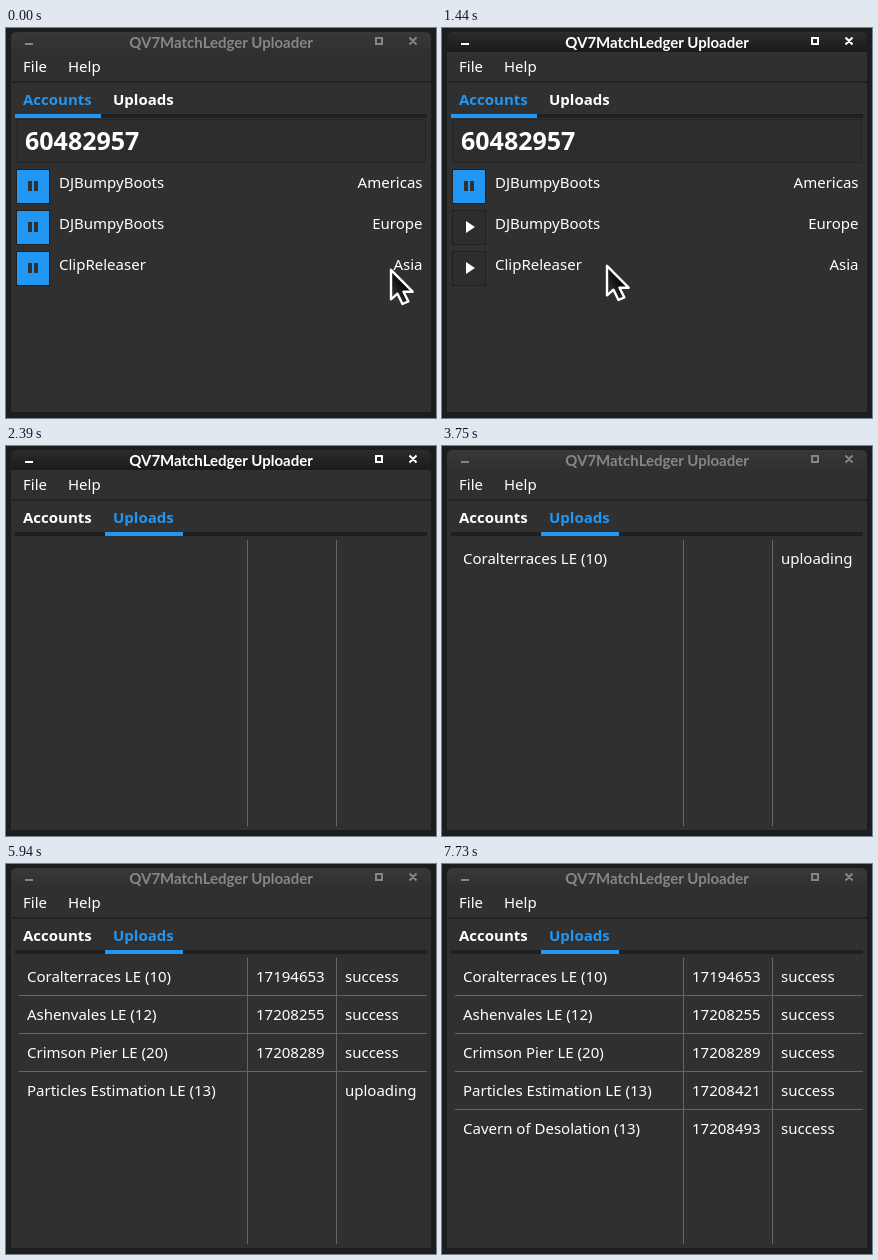
Animation, 430 px wide and 390 px high, one loop 8.35 s. Source, as an HTML page:

```html
<!DOCTYPE html>
<html lang="en">
<head>
<meta charset="utf-8">
<title>Uploader</title>
<style>
  html, body { margin: 0; width: 100%; height: 100%; overflow: hidden; background: #1c1e1e; }
  svg { display: block; width: 430px; height: 390px; }
  text { font: 15px "Noto Sans", sans-serif; fill: #fff; white-space: pre; }
  .right { text-anchor: end; }
  .tab { font-weight: 700; }
  .tab.on { fill: #2196f3; }
  .account { font-size: 25px; font-weight: 700; }
  #bar { fill: url(#active); }
  #caption text { font: 700 15px Lato, sans-serif; text-anchor: middle; }
  #caption { fill: #fff; stroke: #fff; }
  #caption text { stroke: none; }
  .blur #bar { fill: url(#inactive); }
  .blur #caption { stroke: #868686; }
  .blur #caption text { fill: #868686; }
  .rule { fill: #666; }
  .off { display: none; }
</style>
</head>
<body>
<svg viewBox="0 0 430 390" id="stage">
  <defs>
    <linearGradient id="active" x2="0" y2="1">
      <stop stop-color="#2c2c2c"/><stop offset="1" stop-color="#1a1a1a"/>
    </linearGradient>
    <linearGradient id="inactive" x2="0" y2="1">
      <stop stop-color="#383838"/><stop offset="1" stop-color="#303030"/>
    </linearGradient>
    <linearGradient id="ink" x1="0" y1="1" x2=".6" y2=".4">
      <stop stop-color="#444"/><stop offset="1" stop-color="#050505"/>
    </linearGradient>
  </defs>

  <rect x="5" y="20" width="420" height="364" fill="#303030"/>
  <path id="bar" d="M5 24V10Q5 4 11 4H419Q425 4 425 10V24Z"/>
  <g id="caption" stroke-width="2">
    <text x="215" y="20">QV7MatchLedger Uploader</text>
    <path fill="none" d="M19 16H27M370 10H376V16H370ZM403.500 9.500L410.500 16.500M410.500 9.500L403.500 16.500"/>
  </g>

  <text x="17" y="44">File</text>
  <text x="62" y="44">Help</text>
  <rect x="5" y="53" width="420" height="2" fill="#232323"/>

  <rect x="9" y="86" width="412" height="4" fill="#1f1f1f"/>
  <rect id="mark" y="86" height="4" fill="#2196f3"/>
  <text id="tabA" class="tab" x="17" y="77">Accounts</text>
  <text id="tabB" class="tab" x="107" y="77">Uploads</text>

  <g id="accounts">
    <rect x="10.500" y="91.500" width="409" height="43" fill="#2d2d2d" stroke="#262626"/>
    <text class="account" x="19" y="122">60482957</text>
  </g>
  <g id="uploads">
    <rect class="rule" x="241" y="94" width="1" height="286"/>
    <rect class="rule" x="330" y="94" width="1" height="286"/>
  </g>

  <path id="cursor" d="M1 2.800V32.300L7.500 26.700L12.500 37L18.300 34.400L13.500 24.700H22.600Z"
        fill="url(#ink)" stroke="#fff" stroke-width="2.400" stroke-linejoin="round"/>
</svg>

<script>
const LOOP = 8350;
const FOCUS = 560, BLUR = 2840, SWITCH = 2240, LEAVE = 2390;

// name, region, time of pausing
const players = [
  ["DJBumpyBoots", "Americas", Infinity],
  ["DJBumpyBoots", "Europe", 1340],
  ["ClipReleaser", "Asia", 610]
];

// map, replay id, times of: uploading, processing, success
const replays = [
  ["Coralterraces LE (10)", "17194653", 3750, 4370, 4650],
  ["Ashenvales LE (12)", "17208255", 4650, 4870, 5320],
  ["Crimson Pier LE (20)", "17208289", 5320, 5600, 5940],
  ["Particles Estimation LE (13)", "17208421", 5940, 6450, 7060],
  ["Cavern of Desolation (13)", "17208493", 6500, 7110, 7730]
];

// pointer moves: start, end, steps, x, y, downward bow
const home = [384, 239];
const moves = [
  [50, 400, 7, 32, 243, 23],
  [780, 890, 2, 30, 209, 0],
  [1170, 1170, 1, 28, 210, 0],
  [1390, 1440, 2, 164, 235, 0],
  [1660, 2020, 7, 138, 68, 0]
];

const $ = id => document.getElementById(id);

function add(parent, tag, attrs, text = "") {
  const el = document.createElementNS("http://www.w3.org/2000/svg", tag);
  for (const key in attrs) el.setAttribute(key, attrs[key]);
  el.textContent = text;
  return parent.appendChild(el);
}

const show = (el, on) => el.classList.toggle("off", !on);

const buttons = players.map(([name, region], i) => {
  const row = add($("accounts"), "g", { transform: `translate(0 ${i * 41})` });
  const face = add(row, "rect", { x: 10.5, y: 141.5, width: 33, height: 34, stroke: "#202020" });
  const pause = add(row, "path", { d: "M22 153H26V163H22ZM28 153H32V163H28Z", fill: "#303030" });
  const play = add(row, "path", { d: "M24 152L33 158L24 164Z", fill: "#fff" });
  add(row, "text", { x: 53, y: 160 }, name);
  add(row, "text", { x: 416.5, y: 160, class: "right" }, region);
  return { face, pause, play };
});

const rows = replays.map(([map], i) => {
  const row = add($("uploads"), "g", { transform: `translate(0 ${i * 38})` });
  if (i) add(row, "rect", { x: 13, y: 93, width: 408, height: 1, class: "rule" });
  add(row, "text", { x: 21, y: 118 }, map);
  const id = add(row, "text", { x: 250, y: 118 });
  const status = add(row, "text", { x: 339, y: 118 });
  return { row, id, status };
});

function pointer(t) {
  let [x, y] = home;
  for (const [start, end, steps, toX, toY, bow] of moves) {
    if (t < start) break;
    const gap = (end - start) / (steps - 1) || 1;
    const p = Math.min(1, (Math.floor((t - start) / gap + 0.001) + 1) / steps);
    const e = p * p * (3 - 2 * p);
    x += (toX - x) * e;
    y += (toY - y) * e + bow * Math.sin(Math.PI * e);
  }
  return `translate(${x.toFixed(1)} ${y.toFixed(1)})`;
}

function draw(t) {
  const second = t >= SWITCH;
  $("stage").classList.toggle("blur", t < FOCUS || t >= BLUR);
  $("tabA").classList.toggle("on", !second);
  $("tabB").classList.toggle("on", second);
  $("mark").setAttribute("x", second ? 99 : 9);
  $("mark").setAttribute("width", second ? 78 : 86);
  show($("accounts"), !second);
  show($("uploads"), second);
  show($("cursor"), t < LEAVE);
  $("cursor").setAttribute("transform", pointer(t));

  buttons.forEach(({ face, pause, play }, i) => {
    const running = t < players[i][2];
    face.setAttribute("fill", running ? "#2196f3" : "#2d2d2d");
    show(pause, running);
    show(play, !running);
  });

  rows.forEach(({ row, id, status }, i) => {
    const [, number, upload, process, done] = replays[i];
    show(row, t >= upload);
    id.textContent = t >= done ? number : "";
    status.textContent = t >= done ? "success" : t >= process ? "processing" : "uploading";
  });
}

const begin = performance.now();
function tick() {
  draw((performance.now() - begin) % LOOP);
  requestAnimationFrame(tick);
}
tick();
</script>
</body>
</html>
```
